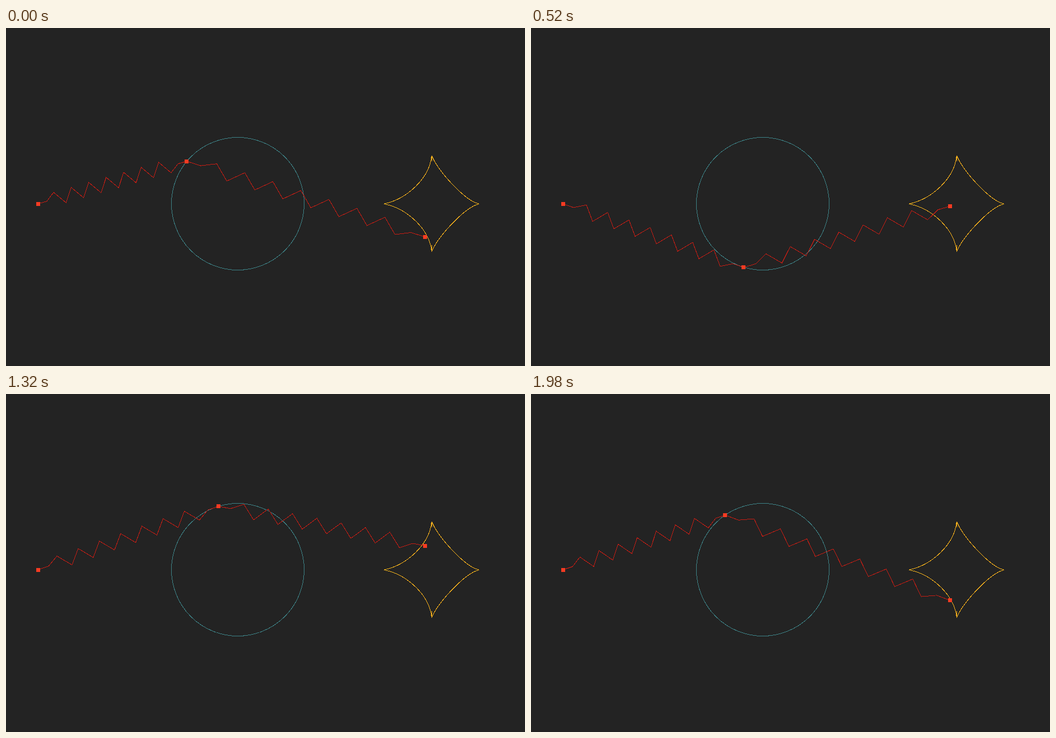
Recreate the animation shown at these times as an HTML page. Size 927 px wide and 604 px high, loop 2 s.

```html
<!DOCTYPE html>
<html lang="en">
<head>
<meta charset="utf-8">
<title>Catastrophe machine</title>
<style>
  html, body { margin: 0; width: 100%; height: 100%; overflow: hidden; background: #232323; }
  svg { display: block; width: 927px; height: 604px; shape-rendering: crispEdges; }
  path, circle { fill: none; stroke-width: 1; }
  .wheel { stroke: #3d8286; }
  .star { stroke: #fbb41c; }
  .spring { stroke: #c51d14; }
  rect { fill: #f53b22; }
</style>
</head>
<body>
<svg viewBox="0 0 927 604">
  <circle class="wheel" cx="414" cy="314" r="118.5"/>
  <path class="star" d="M675 314.3 C715 306 756 270 760.4 228 C772 256 820 309 845 314.3
    C820 320 772 372 760.4 399.5 C756 358 715 322 675 314.3 M760.5 228V238 M760.5 388V399"/>
  <path class="spring" id="left"/>
  <path class="spring" id="right"/>
  <rect id="anchor" width="7" height="7"/>
  <rect id="mass" width="7" height="7"/>
  <rect id="control" width="7" height="7"/>
</svg>
<script>
  const FRAME = 20, FRAMES = 100;
  const CX = 414, CY = 314.2, R = 118.7;

  // Lengths in wheel radii, time in frames, unit springs with rest length 1.
  const ANCHOR = 3, REACH = 2.816, SWING = 0.5, OMEGA = 0.06, DAMPING = 0.51;
  const START = -0.695, START_SPEED = 0.048;
  const HALF = Math.PI / OMEGA, STEPS = 50;

  const controlY = n => SWING * Math.cos(OMEGA * (n - 1));

  // Torque on the wheel; angle is measured from its left side, positive downwards.
  function torque(a, y) {
    const s = Math.sin(a), c = Math.cos(a);
    const l1 = Math.hypot(ANCHOR - c, s);
    const l2 = Math.hypot(REACH + c, s - y);
    return (REACH * s + y * c) * (1 - 1 / l2) - ANCHOR * s * (1 - 1 / l1);
  }

  // One half cycle; the other half is its mirror image.
  function swing() {
    const last = Math.round(HALF * STEPS), dt = 1 / STEPS, path = [START];
    let a = START, v = START_SPEED;
    for (let i = 0; i < last; i++) {
      v += (torque(a, controlY(i * dt)) - DAMPING * v) * dt;
      a += v * dt;
      path.push(a);
    }
    // Ease the end onto the mirrored start.
    const gap = -START - a;
    return path.map((p, i) => p + gap * Math.exp(0.25 * (i - last) * dt));
  }

  const path = swing();
  function angle(n) {
    const side = n < HALF ? 1 : -1;
    return side * path[Math.round((n % HALF) * STEPS)];
  }

  const byId = id => document.getElementById(id);
  const left = byId("left"), right = byId("right");
  const mass = byId("mass"), control = byId("control");

  function place(box, p) {
    box.setAttribute("x", p.x - 3.5);
    box.setAttribute("y", p.y - 3.5);
  }

  function zigzag(p, q) {
    const dx = q.x - p.x, dy = q.y - p.y, len = Math.hypot(dx, dy);
    const pts = [];
    for (let i = 0; i <= 17; i++) {
      const bend = i < 2 || i > 15 ? 0 : (i % 2 ? -12 : 12) / len;
      const x = p.x + dx * i / 17 + dy * bend;
      const y = p.y + dy * i / 17 - dx * bend;
      pts.push(x.toFixed(2) + " " + y.toFixed(2));
    }
    return "M" + pts.join("L");
  }

  const anchorPos = { x: 57.1, y: CY };
  place(byId("anchor"), anchorPos);

  function draw(n) {
    const a = angle(n);
    const m = { x: CX - R * Math.cos(a), y: CY + R * Math.sin(a) };
    const c = { x: 748.4, y: CY + R * controlY(n) };
    left.setAttribute("d", zigzag(anchorPos, m));
    right.setAttribute("d", zigzag(m, c));
    place(mass, m);
    place(control, c);
  }

  const t0 = performance.now();
  function tick() {
    const t = Math.max(0, performance.now() - t0);
    draw(Math.floor(t / FRAME + 0.001) % FRAMES);
    requestAnimationFrame(tick);
  }
  tick();
</script>
</body>
</html>
```
